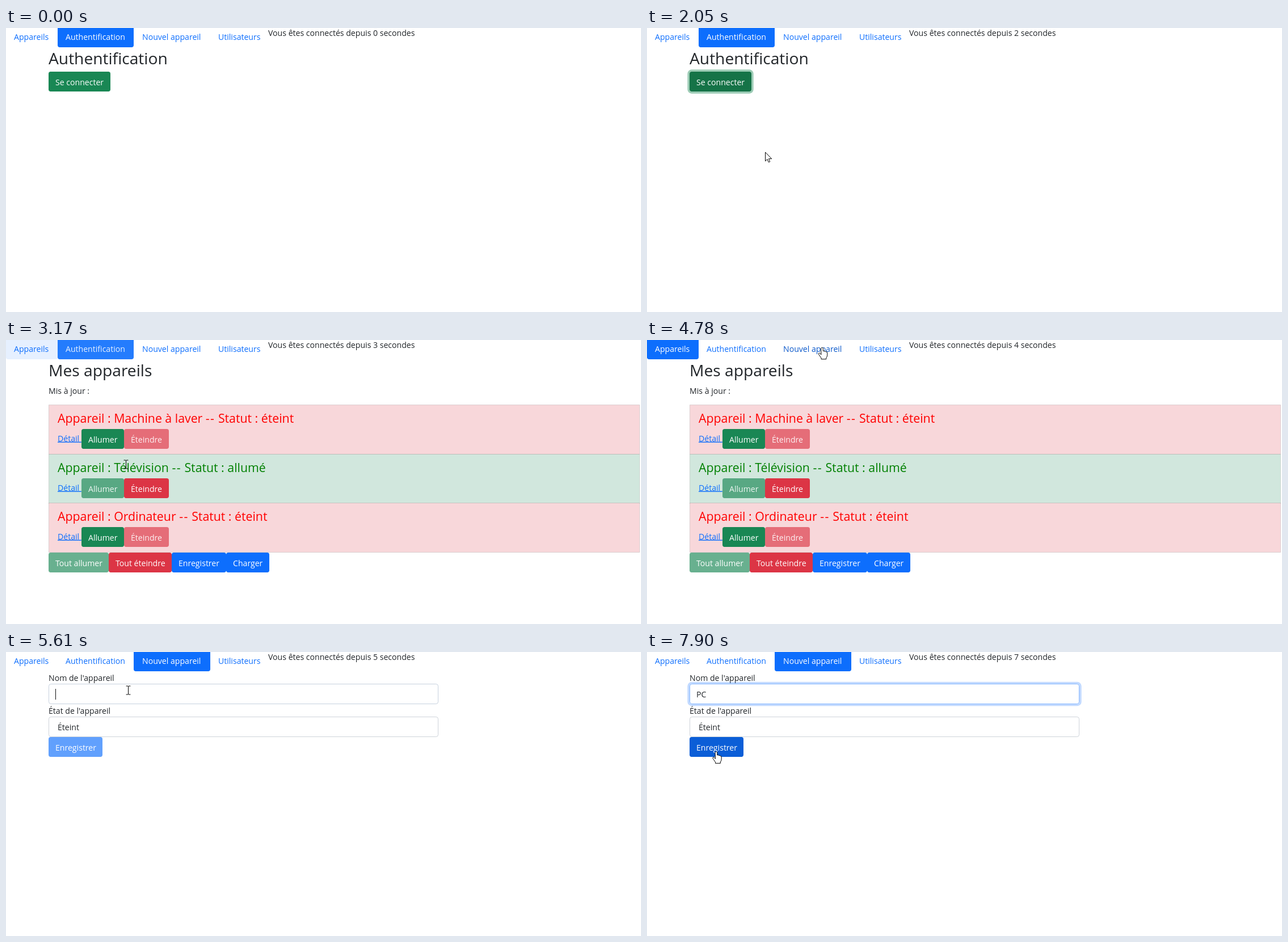
These frames come from a looping animation (1119x501 px, 8 s). An HTML page:

```html
<!DOCTYPE html>
<html lang="fr">
<head>
<meta charset="utf-8">
<title>Appareils</title>
<style>
  html, body { margin: 0; width: 100%; height: 100%; overflow: hidden; background: #fff; }
  svg { display: block; }
  text {
    font: 14.1px "Open Sans", "Noto Sans", sans-serif;
    font-variant-ligatures: none;
    fill: #212529;
    white-space: pre;
  }
  .h2 { font-size: 28.2px; }
  .h4 { font-size: 21.3px; }
  .dash { letter-spacing: 1.4px; }
  .btn text { fill: #fff; }
  .link { fill: #0d6efd; text-decoration: underline; }
  .item { stroke: rgba(0, 0, 0, .125); }
  .field { fill: #fff; stroke: #ced4da; }
  .ring { fill: none; stroke-width: 3.7; }
  #pointer path { stroke-linejoin: round; stroke-linecap: round; }
</style>
</head>
<body>
<svg id="stage" width="1119" height="501" viewBox="0 0 1119 501"></svg>
<script>
const LOOP = 8000, LIST_AT = 3170, FORM_AT = 4860, FOCUS_AT = 5610;
const BLUE = '#0d6efd', GREEN = '#198754', RED = '#dc3545';

const text = (x, y, s, attrs = '') => `<text x="${x}" y="${y}" ${attrs}>${s}</text>`;

const button = (x, y, w, label, color, attrs = '') =>
  `<g class="btn" ${attrs}><rect x="${x}" y="${y}" width="${w}" height="35" rx="3.7" fill="${color}"/>` +
  text(x + 12, y + 24, label) + '</g>';

const faded = 'style="opacity:.65"';

const tabs = [
  { label: 'Appareils', x: 14, left: 0, right: 91 },
  { label: 'Authentification', x: 105, left: 91, right: 225 },
  { label: 'Nouvel appareil', x: 240, left: 225, right: 360 },
  { label: 'Utilisateurs', x: 374, left: 360, right: 462 }
];

const nav = tabs.map((tab, i) =>
  `<rect id="pill${i}" x="${tab.left}" y="-4" width="${tab.right - tab.left}" height="38" rx="3.7" fill="${BLUE}"/>` +
  text(tab.x, 21, tab.label, `id="tab${i}"`)).join('');

function item(name, on, y) {
  return `<rect class="item" x="75.5" y="${y + .5}" width="1041" height="87" fill="${on ? '#d1e7dd' : '#f8d7da'}"/>` +
    text(91, y + 31.5, `Appareil : ${name} <tspan class="dash">--</tspan> Statut : ${on ? 'allumé' : 'éteint'}`,
      `class="h4" style="fill:${on ? 'green' : 'red'}"`) +
    text(91, y + 64.5, 'Détail\u00a0', 'class="link"') +
    button(133, y + 43, 75, 'Allumer', GREEN, on ? faded : '') +
    button(208, y + 43, 79, 'Éteindre', RED, on ? '' : faded);
}

const authPage = text(75, 64, 'Authentification', 'class="h2"') +
  '<rect id="loginRing" class="ring" x="73.2" y="75.2" width="112.6" height="38.6" rx="5.5" stroke="#3c996e"/>' +
  button(75, 77, 109, 'Se connecter', GREEN, 'id="login"');

const listPage = text(75, 64, 'Mes appareils', 'class="h2"') +
  text(75, 94.5, 'Mis à jour :') +
  item('Machine à laver', false, 114) +
  item('Télévision', true, 201) +
  item('Ordinateur', false, 287) +
  button(75, 375, 106, 'Tout allumer', GREEN, faded) +
  button(181, 375, 111, 'Tout éteindre', RED) +
  button(292, 375, 96, 'Enregistrer', BLUE) +
  button(388, 375, 76, 'Charger', BLUE);

const formPage = text(75, 51, "Nom de l'appareil") +
  '<rect id="nameRing" class="ring" x="73.2" y="54.6" width="690.6" height="38.8" rx="5.5" stroke="#0d6efd"/>' +
  '<rect id="name" class="field" x="75.5" y="56.5" width="686" height="35" rx="3.7"/>' +
  text(87, 80, '', 'id="typed"') +
  '<rect id="caret" y="65" width="1" height="19" fill="#111"/>' +
  text(75, 109, "État de l'appareil") +
  '<rect class="field" x="75.5" y="114.5" width="686" height="35" rx="3.7"/>' +
  text(91, 138, 'Éteint') +
  button(75, 150, 95, 'Enregistrer', BLUE, 'id="save"');

const pointers =
  '<path id="arrow" fill="#fff" stroke="#000" d="M.5.5V15.8L4 12.5 6.3 17.8 8.7 16.8 6.5 11.7H11.3Z"/>' +
  '<path id="hand" fill="#fff" stroke="#000" d="M-1.8 1.8Q0-.9 1.8 1.8V7Q3.5 6 4.9 7.7 6.4 7 7.4 8.6 9 8.2 9.2 10V14Q9.2 17 7.3 19V21.3H-1.5V19.3L-5.6 13.3Q-7 10.8-5.2 10.4-3.8 10.3-1.8 13Z"/>' +
  '<path id="beam" fill="none" stroke="#000" d="M-3.5-7.5H-1Q0-7.5 0-6.5V6.5Q0 7.5-1 7.5H-3.5M3.5-7.5H1Q0-7.5 0-6.5M3.5 7.5H1Q0 7.5 0 6.5"/>';

const stage = document.getElementById('stage');
stage.innerHTML = `<g id="auth">${authPage}</g><g id="list">${listPage}</g><g id="form">${formPage}</g>` +
  nav + text(462, 14, '', 'id="clock"') + `<g id="pointer">${pointers}</g>`;

const el = {};
stage.querySelectorAll('[id]').forEach(node => el[node.id] = node);
const show = (id, on) => el[id].style.display = on ? '' : 'none';

// Pointer legs: start, end, steps, from x, y, to x, y
const legs = [
  [190, 890, 11, 763, 449, 117, 100.5],
  [1030, 1520, 8, 117, 100.5, 208, 219],
  [3030, 3040, 2, 208, 219, 211.5, 219.5],
  [3770, 4570, 12, 211.5, 219.5, 311, 2],
  [4640, 4780, 3, 311, 2, 308.5, 12.5],
  [4860, 5400, 9, 308.5, 12.5, 215.5, 67.5],
  [7140, 7820, 11, 215.5, 67.5, 124, 177],
  [7890, 7900, 2, 124, 177, 122, 175]
];

const smooth = p => p * p * (3 - 2 * p);
const lerp = (a, b, p) => a + (b - a) * p;
const inside = (p, x0, y0, x1, y1) => p.x >= x0 && p.x <= x1 && p.y >= y0 && p.y <= y1;

function pointerAt(t) {
  const leg = legs.findLast(l => t >= l[0]);
  if (!leg) return null;
  const [start, end, n, x0, y0, x1, y1] = leg;
  const k = Math.min(n, 1 + Math.floor((t - start) / ((end - start) / (n - 1)) + .01));
  const p = smooth(k / n);
  return { x: lerp(x0, x1, p), y: lerp(y0, y1, p) };
}

// Short transition, held in visible steps
function fade(t, at) {
  if (t < at) return 0;
  return [.1, .74, 1][Math.min(2, Math.floor((t - at) / 68))];
}

function mix(a, b, p) {
  const part = (c, i) => parseInt(c.slice(i, i + 2), 16);
  return `rgb(${[1, 3, 5].map(i => Math.round(lerp(part(a, i), part(b, i), p)))})`;
}

function kindAt(t, p) {
  if (p.y < 34) return 'hand';
  if (t < 3040) return inside(p, 75, 77, 184, 112) ? 'hand' : 'arrow';
  if (t < FORM_AT) {
    const onTitle = [138, 225, 311].some(y => inside(p, 91, y - 13, 460, y + 13));
    return onTitle ? 'beam' : 'arrow';
  }
  if (inside(p, 75, 56, 762, 92)) return 'beam';
  return inside(p, 75, 150, 170, 185) ? 'hand' : 'arrow';
}

function render(t) {
  const page = t < LIST_AT ? 'auth' : t < FORM_AT ? 'list' : 'form';
  ['auth', 'list', 'form'].forEach(id => show(id, id === page));

  const p = pointerAt(t);
  const kind = p && kindAt(t, p);
  show('pointer', p);
  if (p) {
    el.pointer.setAttribute('transform', `translate(${p.x.toFixed(1)} ${p.y.toFixed(1)})`);
    ['arrow', 'hand', 'beam'].forEach(id => show(id, id === kind));
  }

  const toList = fade(t, LIST_AT), toForm = fade(t, FORM_AT);
  const hoverNew = p && page === 'list' && inside(p, 225, 0, 360, 34);
  [toList - toForm, 1 - toList, toForm, 0].forEach((on, i) => {
    el['pill' + i].style.opacity = on;
    const idle = i === 2 && hoverNew ? '#0a58ca' : BLUE;
    // Label turns white with its pill, except at the faintest step
    el['tab' + i].style.fill = mix(idle, '#ffffff', on < .2 ? 0 : on);
  });

  const seconds = [1030, 2050, 3040, 4060, 5070, 6080, 7140].filter(s => t >= s).length;
  el.clock.textContent = `Vous êtes connectés depuis ${seconds} secondes`;

  const loginHot = t >= 1030 || kind === 'hand';
  el.login.firstChild.style.fill = loginHot ? '#157347' : GREEN;
  el.loginRing.style.opacity = .5 * fade(t, 1030);

  const focus = fade(t, FOCUS_AT);
  el.name.style.stroke = mix('#ced4da', '#86b7fe', focus);
  el.nameRing.style.opacity = focus < .2 ? 0 : .25 * focus;

  const typed = t < 6560 ? '' : t < 6630 ? 'P' : 'PC';
  el.typed.textContent = typed;
  show('caret', (t >= FOCUS_AT && t < 6150) || (t >= 6560 && t < 7140));
  el.caret.setAttribute('x', 87 + 9 * typed.length);

  el.save.style.opacity = t < 6560 ? .65 : 1;
  el.save.firstChild.style.fill = page === 'form' && kind === 'hand' && p.y > 100 ? '#0b5ed7' : BLUE;
}

function tick() {
  render(performance.now() % LOOP);
  requestAnimationFrame(tick);
}
tick();
</script>
</body>
</html>
```
